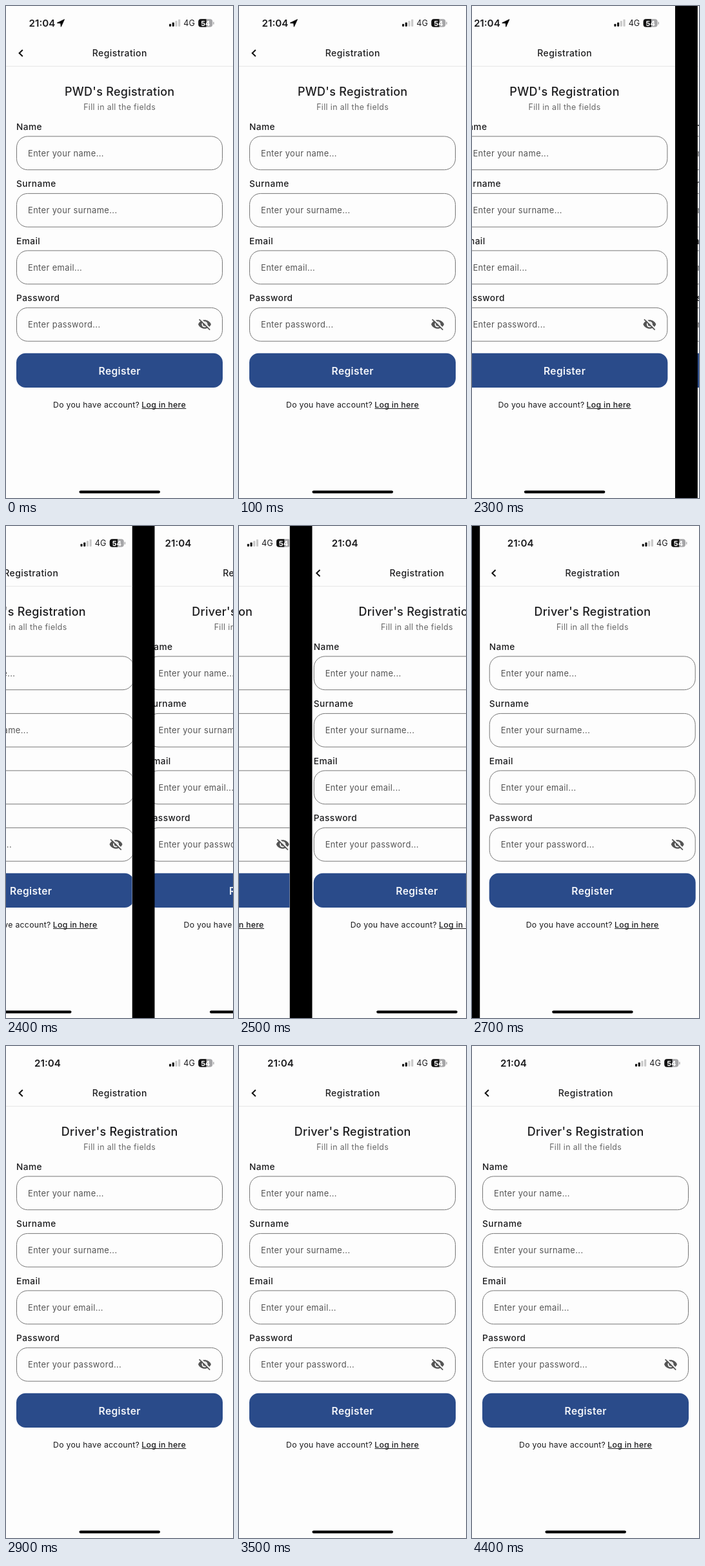
These frames come from a looping animation (352x762 px, 5.2 s). An HTML page:

```html
<!DOCTYPE html>
<html lang="en">
<head>
<meta charset="utf-8">
<title>Registration forms</title>
<style>
  html, body { margin: 0; height: 100%; overflow: hidden; background: #fdfdfd; }
  #stage { display: block; width: 100%; height: 100%; }
  text { font: 400 12.9px Inter, sans-serif; letter-spacing: .38px; fill: #1c1c1e; }
  .mid { text-anchor: middle; }
  .time { font-size: 15.2px; font-weight: 600; letter-spacing: 0; }
  .net { font-size: 12.6px; letter-spacing: 0; }
  .level { font-size: 11px; font-weight: 700; letter-spacing: 0; fill: #fff; }
  .bar { font-size: 14px; font-weight: 500; letter-spacing: .4px; }
  .title { font-size: 18px; font-weight: 500; letter-spacing: .27px; }
  .sub { font-size: 12.4px; letter-spacing: .36px; fill: #666; }
  .label { font-size: 13.7px; font-weight: 500; letter-spacing: .42px; }
  .hint { fill: #555; }
  .button { font-size: 15.6px; font-weight: 600; letter-spacing: .35px; fill: #f4f6fa; }
  .foot { font-size: 12.3px; letter-spacing: .26px; }
  .link { font-weight: 500; letter-spacing: .3px; }
</style>
</head>
<body>
<svg id="stage" viewBox="0 0 352 762">
  <g id="driver"></g>
  <rect id="gap" width="35" height="762"/>
  <svg id="window" height="762"><g id="pwd"></g></svg>
</svg>
<script>
const LOOP = 5200, STEP = 100;
const PAGE_SHIFT = 340, GAP = 35, GAP_TRAVEL = 352 + GAP;
const $ = id => document.getElementById(id);

const text = (x, y, cls, str) => `<text x="${x}" y="${y}" class="${cls}">${str}</text>`;
const box = (x, y, w, h, r, fill, extra = '') =>
  `<rect x="${x}" y="${y}" width="${w}" height="${h}" rx="${r}" fill="${fill}" ${extra}/>`;

function statusBar(timeX, arrow) {
  const bars = [4, 6.3, 8.7, 11].map((h, i) =>
    box(253 + i * 4.7, 31.7 - h, 3.1, h, .9, i < 2 ? '#111' : '#c8c8c8')).join('');
  return text(timeX, 32, 'time', '21:04') +
    (arrow ? '<path d="M90.5 20.8 79.3 26.2 84.8 26.8 85.3 32.2Z" stroke="#111" stroke-linejoin="round"/>' : '') +
    bars + text(275.3, 31.3, 'net', '4G') +
    box(298.3, 20.3, 22, 12.3, 4, '#a6a6a8') +
    '<path d="M310.5 20.3H302.3a4 4 0 0 0-4 4v4.3a4 4 0 0 0 4 4H310.5Z" fill="#111"/>' +
    box(321.2, 24.4, 1.4, 4.2, .7, '#a6a6a8') +
    text(309.3, 30.5, 'level mid', '54');
}

const hiddenEye = `<g transform="translate(308 493)" fill="#555">
  <path d="M-10 0C-6.5-9 6.5-9 10 0C6.5 9-6.5 9-10 0Z"/>
  <circle r="4.5" fill="#fdfdfd"/><circle r="2.7"/>
  <path d="M-7.2-9.2 9.8 7.8" stroke="#fdfdfd" stroke-width="2"/>
  <path d="M-8.4-7.6 8.2 8.6" stroke="#555" stroke-width="1.7"/></g>`;

function field(label, hint, i) {
  const y = 88.5 * i;
  return text(16, 191.5 + y, 'label', label) +
    box(16.5, 201.9 + y, 319, 51.8, 17, 'none', 'stroke="#777"') +
    text(34, 232.7 + y, 'hint', hint);
}

function page(title, hints, timeX, arrow) {
  const labels = ['Name', 'Surname', 'Email', 'Password'];
  return box(0, 0, 352, 762, 0, '#fdfdfd') + statusBar(timeX, arrow) +
    '<path d="M25.8 68 20.6 73 25.8 78" fill="none" stroke="#111" stroke-width="2"/>' +
    text(176.3, 77.7, 'bar mid', 'Registration') +
    box(0, 92.8, 352, 1, 0, '#e6e6e6') +
    text(176.2, 139, 'title mid', title + ' Registration') +
    text(176.2, 161, 'sub mid', 'Fill in all the fields') +
    labels.map((label, i) => field(label, `Enter ${hints[i]}...`, i)).join('') + hiddenEye +
    box(16, 537.8, 320, 53.3, 14.5, '#2a4b8a') +
    text(176.2, 570.5, 'button mid', 'Register') +
    text(73, 621.5, 'foot', 'Do you have account?') +
    text(210.2, 621.5, 'foot link', 'Log in here') +
    box(210.5, 623, 68.8, 1, 0, '#1c1c1e') +
    box(113.5, 750.4, 125.5, 4.4, 2.2, '#000');
}

$('pwd').innerHTML = page("PWD's", ['your name', 'your surname', 'email', 'password'], 35.5, true);
$('driver').innerHTML =
  page("Driver's", ['your name', 'your surname', 'your email', 'your password'], 44, false);

// Share of the swipe still to go: 1 shows the first page, 0 the second.
function remaining(t) {
  if (t < 2300) return 1;
  const p = Math.exp(-Math.pow((t - 2228) / 244, 1.88));
  return p < .002 ? 0 : p;
}

// The pages travel slightly less than the gap between them.
function draw() {
  const t = Math.floor(performance.now() % LOOP / STEP) * STEP;
  const p = remaining(t), edge = GAP_TRAVEL * p - GAP;
  $('driver').setAttribute('transform', `translate(${PAGE_SHIFT * p})`);
  $('pwd').setAttribute('transform', `translate(${PAGE_SHIFT * (p - 1)})`);
  $('gap').setAttribute('x', edge);
  $('window').setAttribute('width', Math.max(0, edge));
  requestAnimationFrame(draw);
}
draw();
</script>
</body>
</html>
```
